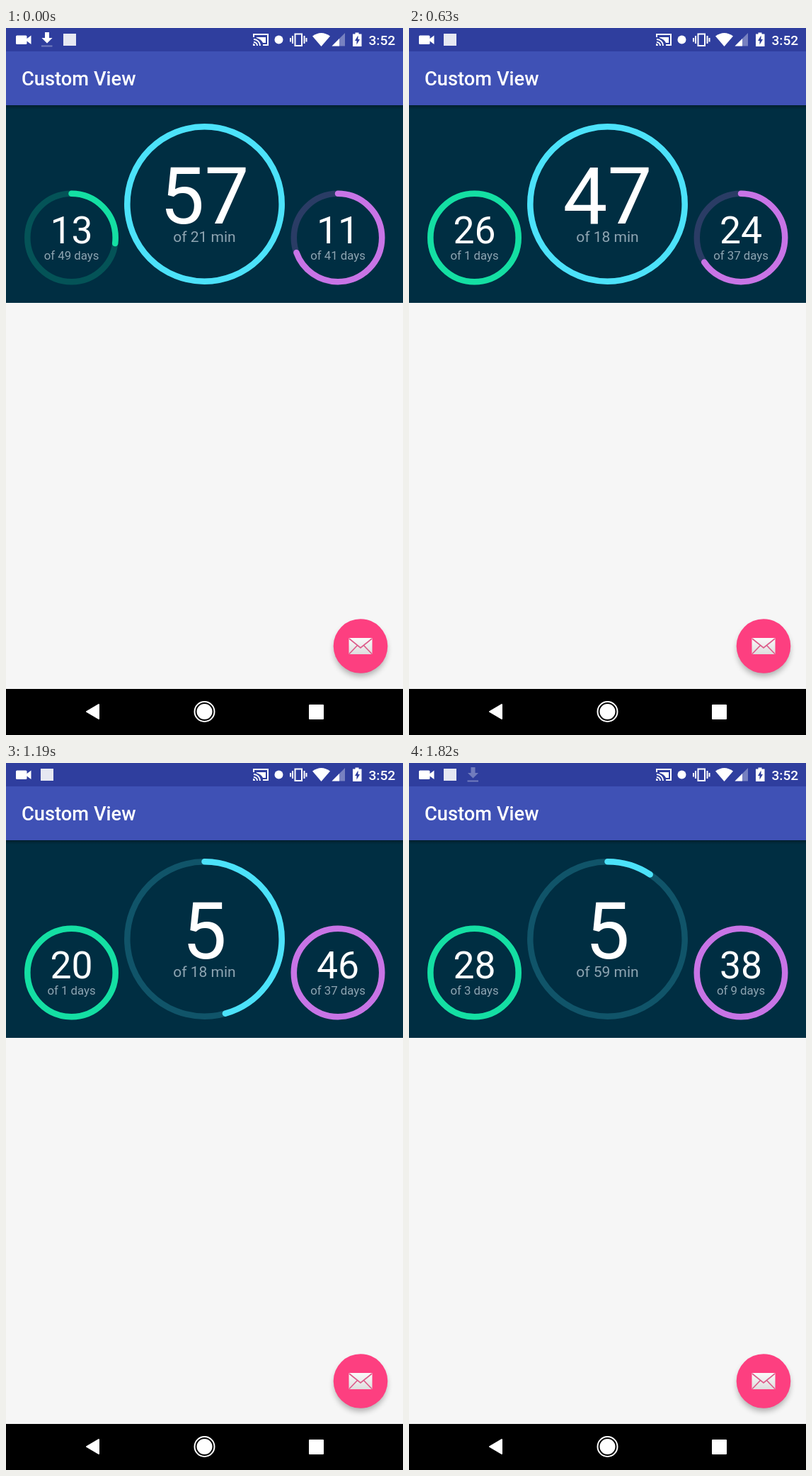
Animation, 561 px wide and 998 px high, one loop 1890 ms. Source, as an HTML page:

```html
<!DOCTYPE html>
<html lang="en">
<head>
<meta charset="utf-8">
<title>Custom View</title>
<style>
  html, body { margin: 0; width: 100%; height: 100%; overflow: hidden; background: #f6f6f6; }
  svg { display: block; width: 561px; height: 998px; }
  text { font-family: Roboto, "Noto Sans", sans-serif; fill: #fff; }
  .dial text { text-anchor: middle; }
  .dial .limit { fill: #8ea5b2; }
  .dial circle { fill: none; stroke-width: 8.5; }
</style>
</head>
<body>
<svg viewBox="0 0 561 998">
  <defs>
    <linearGradient id="shade" x2="0" y2="1">
      <stop offset="0" stop-opacity=".32"/><stop offset="1" stop-opacity="0"/>
    </linearGradient>
    <linearGradient id="paper" x2="0" y2="1">
      <stop offset="0" stop-color="#fafafa"/><stop offset="1" stop-color="#dedede"/>
    </linearGradient>
    <filter id="blur" x="-30%" y="-30%" width="160%" height="160%"><feGaussianBlur stdDeviation="4"/></filter>
    <path id="arrow" d="M55 6h6v8h4.500l-7.500 7.500l-7.500-7.500h4.500z"/>
    <clipPath id="fill"><rect id="level" x="48" y="5" width="20"/></clipPath>
  </defs>

  <rect width="561" height="998" fill="#f6f6f6"/>
  <rect y="109" width="561" height="279" fill="#002e42"/>
  <rect y="109" width="561" height="6" fill="url(#shade)"/>
  <rect width="561" height="33" fill="#2f3e9e"/>
  <rect y="33" width="561" height="76" fill="#3f51b5"/>
  <text x="22" y="81" font-size="27.3" font-weight="500">Custom View</text>

  <!-- status bar -->
  <g fill="#fff">
    <path d="M15.500 10.500h12.500q1.500 0 1.500 1.500v3l6-4.500v12.500l-6-4.500v3q0 1.500-1.500 1.500h-12.500q-1.500 0-1.500-1.500v-9.500q0-1.500 1.500-1.500z"/>
    <g id="download">
      <use href="#arrow" opacity=".32"/>
      <use href="#arrow" clip-path="url(#fill)"/>
      <rect x="50" y="24.500" width="15.500" height="2" opacity=".32"/>
    </g>
    <rect id="badge" x="49" y="8" width="18" height="17" fill="#e6e8f2"/>
    <g fill="none" stroke="#fff" stroke-width="2">
      <path d="M350 13v-4h20v15h-7M350 16a9 9 0 0 1 9 9M350 20a5 5 0 0 1 5 5"/>
      <path d="M408.500 8.500h9.500v16.500h-9.500zM405 11v11M421.500 11v11M402 14v5.500M424.500 14v5.500"/>
    </g>
    <path d="M354 13h13v8h-4q-2-5-9-7zM349 22q3 0 3 3h-3z"/>
    <circle cx="385.500" cy="16.500" r="6"/>
    <path d="M433 11.500q12.500-9 25 0l-12.500 14.500z"/>
    <path d="M479 7v18.500h-18.500z" opacity=".35"/>
    <path d="M471 15v10.500h-10.500z"/>
    <path d="M493.500 6.500h5v2h4v17.500h-12.500v-17.500h3.500z"/>
    <path d="M497.500 10.500l-4.500 7.500h2.500v5.500l4.500-7.500h-2.500z" fill="#2f3e9e"/>
  </g>
  <text x="512.500" y="24" font-size="19.1" font-weight="500">3:52</text>

  <g id="dials"></g>

  <!-- floating button -->
  <circle cx="501" cy="878" r="37" opacity=".3" filter="url(#blur)"/>
  <circle cx="501" cy="872.500" r="38.300" fill="#fd3f80"/>
  <rect x="484.500" y="861" width="33" height="23" rx="1" fill="url(#paper)"/>
  <path d="M485 862l16 13l16-13M485 883.500l11.500-12M517 883.500l-11.500-12" fill="none" stroke="#dd5d8b" stroke-width="1.700"/>

  <!-- navigation bar -->
  <rect y="933" width="561" height="65"/>
  <g fill="#fff" stroke="#fff" stroke-width="2" stroke-linejoin="round">
    <path d="M114 965l17-10v20z"/>
    <circle cx="280.500" cy="965" r="14" fill="none"/>
    <circle cx="280.500" cy="965" r="10"/>
    <rect x="429" y="956" width="19" height="19"/>
  </g>
</svg>
<script>
const LOOP = 1890, TICK = 70, DURATION = 950;

const dials = [
  { x: 92.5, y: 296, r: 62.2, color: '#14dfa3', unit: 'days', size: 53.5, base: 304, small: 16.8, limitBase: 327 },
  { x: 280.5, y: 248.5, r: 109.2, color: '#4ce2fa', unit: 'min', size: 112, base: 276, small: 21, limitBase: 302 },
  { x: 469, y: 296, r: 62.2, color: '#c874e6', unit: 'days', size: 53.5, base: 304, small: 16.8, limitBase: 327 }
];

// For each dial: limit, value from/to, ring share from/to (a share above 1 is a full ring).
const phases = [
  { start: 0, dials: [[49, 13.3, 31.3, .271, .639], [21, 57.3, 59.3, 6, 4.6], [41, 11.3, 20.9, .695, .44]] },
  { start: 530, dials: [[1, 27.7, 20, .566, 20], [18, 58.9, 0, 4.9, 0], [37, 19, 49, .49, 1.324]] },
  { start: 1600, dials: [[3, 20, 40, 20, 13.3], [59, 0, 13.4, 0, .227], [9, 49, 23, 1.324, 2.56]] }
];

const find = id => document.getElementById(id);

function add(parent, tag, attrs) {
  const node = document.createElementNS('http://www.w3.org/2000/svg', tag);
  for (const key in attrs) node.setAttribute(key, attrs[key]);
  return parent.appendChild(node);
}

for (const d of dials) {
  const group = add(find('dials'), 'g', { class: 'dial' });
  const ring = { cx: d.x, cy: d.y, r: d.r, stroke: d.color };
  add(group, 'circle', { ...ring, opacity: .21 });
  d.arc = add(group, 'circle', {
    ...ring, pathLength: 1, 'stroke-linecap': 'round', transform: `rotate(-90 ${d.x} ${d.y})`
  });
  d.value = add(group, 'text', { x: d.x, y: d.base, 'font-size': d.size });
  d.limit = add(group, 'text', { x: d.x, y: d.limitBase, 'font-size': d.small, class: 'limit' });
}

const mix = (from, to, k) => from + (to - from) * k;

function drawDial(d, [limit, v0, v1, share0, share1], k) {
  const share = mix(share0, share1, k);
  d.arc.style.display = share > 0 ? '' : 'none';
  d.arc.setAttribute('stroke-dasharray', share < 1 ? `${share} 2` : 'none');
  d.value.textContent = Math.floor(mix(v0, v1, k));
  d.limit.textContent = `of ${limit} ${d.unit}`;
}

function drawStatus(t) {
  const before = t < 530, after = t >= 1260;
  const step = (Math.floor(t / 140) + 3) % 4;
  find('download').style.display = before || after ? '' : 'none';
  find('download').setAttribute('transform', `translate(${after ? 32.5 : 0})`);
  find('badge').setAttribute('x', before ? 81 : 49);
  find('level').setAttribute('height', [0, 6, 11, 18][step]);
}

function draw(time) {
  const t = Math.floor(time % LOOP / TICK) * TICK;
  const phase = phases.findLast(p => t >= p.start);
  const left = Math.max(0, 1 - (t - phase.start) / DURATION);
  dials.forEach((d, i) => drawDial(d, phase.dials[i], 1 - left * left));
  drawStatus(t);
}

const begin = performance.now();
(function frame() {
  draw(performance.now() - begin);
  requestAnimationFrame(frame);
})();
</script>
</body>
</html>
```
